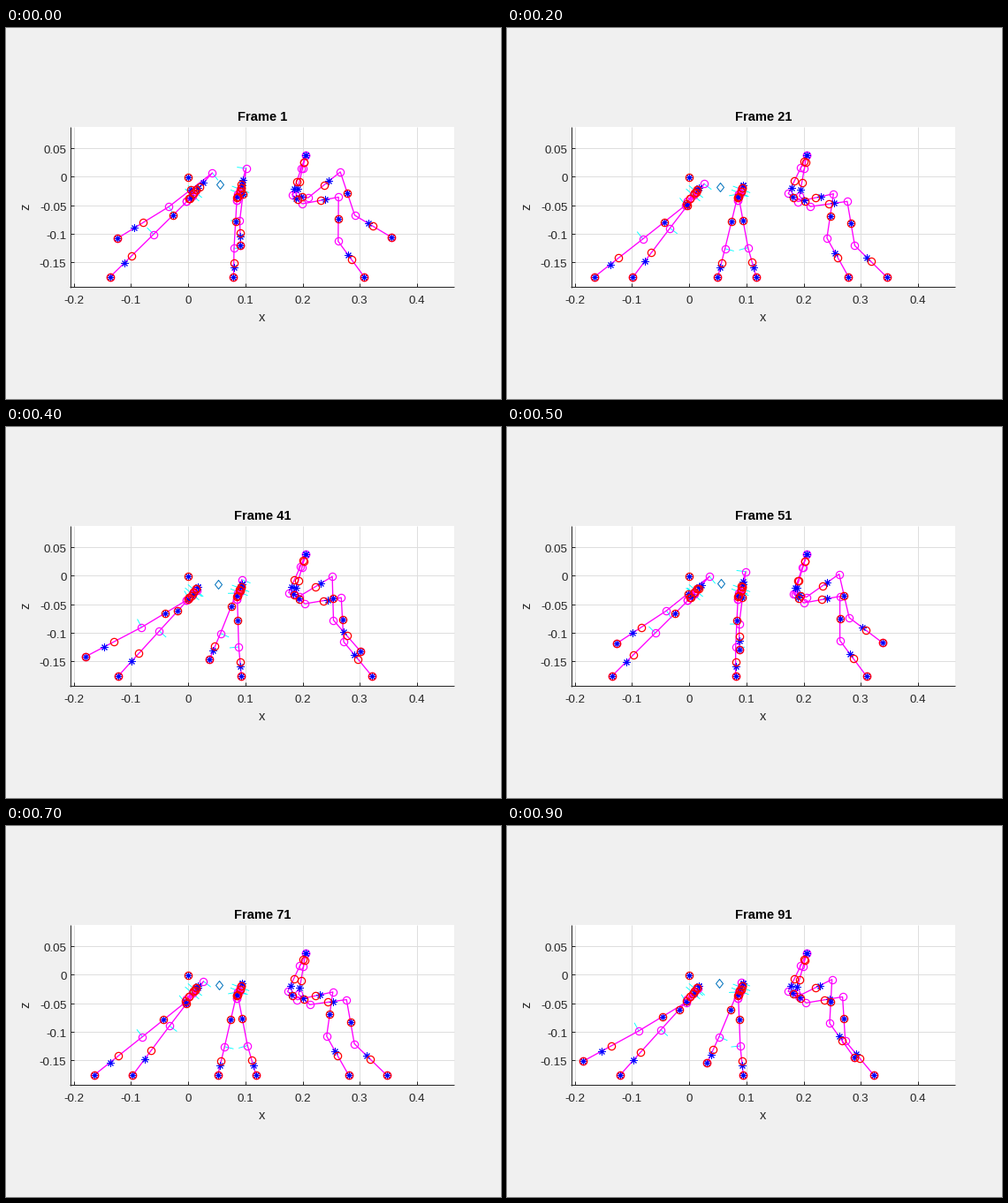
A matplotlib script for the animation above (1 s loop, 560 by 420 pixels).

```python
from collections import namedtuple

import numpy as np
import matplotlib.pyplot as plt
from matplotlib.animation import FuncAnimation

W, H, PT = 560, 420, 0.72          # stage in pixels, points per pixel
FRAMES, CYCLE, LAG = 10, 5, 0.12   # the second stride runs slightly late
INK, GROUND = "#262626", 281.5
ORIGIN, SCALE = np.array([206.2, 168.7]), 647.5

# A joint sits at `rest` and follows the foot's travel and its lift.
Joint = namedtuple("Joint", "rest travel lift")
Shape = namedtuple("Shape", "root foot_ref hip joints stars")
Gait = namedtuple("Gait", "landing swing drift skew")
Leg = namedtuple("Leg", "shape gait landing_x height reach tick_side")

REAR_STARS = {0: 0, 3: 0.65, 4: 0.5, 5: 0.67}
FRONT_STARS = {0: 0, 1: 0.77, 2: 0.4, 3: 0.64, 4: 0.5, 5: 0.38}
HIND = Shape((217.5, 181), 121, (204.5, 196), [
    Joint((213, 188), (0.48, -0.55), (0.41, -0.48)),
    Joint((169.5, 232.2), (0.70, -0.28), (0.25, -0.65))], REAR_STARS)
MIDDLE = Shape((267.5, 178), 258, (261, 195), [
    Joint((262, 187.5), (0, 0), (0.28, -0.80)),
    Joint((258.5, 248.8), (0.60, -0.03), (0.05, -0.86))], REAR_STARS)
FRONT = Shape((339.5, 144), 406, None, [
    Joint((324.3, 188.2), (0.29, 0.07), (-0.10, -0.03)),
    Joint((335.8, 198.5), (0.33, 0.13), (-0.08, -0.24)),
    Joint((376.7, 191), (0.36, 0.20), (-0.20, -0.77)),
    Joint((376.3, 241), (0.73, 0.20), (-0.08, -0.79))], FRONT_STARS)

EARLY = Gait(landing=1.25, swing=1.5, drift=7.8, skew=0.5)
LATE = Gait(landing=4.85, swing=1.2, drift=9.5, skew=1)
LEGS = [Leg(HIND, EARLY, 148.8, 46, 5, 1), Leg(HIND, LATE, 119.5, 28, 0, -1),
        Leg(MIDDLE, EARLY, 288.3, 38, 4, -1), Leg(MIDDLE, LATE, 259.4, 24, 0, 1),
        Leg(FRONT, EARLY, 436, 47, 38, 0), Leg(FRONT, LATE, 407.4, 35, 25, 0)]


def foot(leg, t):
    """Foot x and lift: steady drift on the ground, then an arched swing."""
    gait = leg.gait
    stance = CYCLE - gait.swing
    since = (t - gait.landing) % CYCLE
    if since < stance:
        return leg.landing_x - gait.drift * since, 0
    u = (since - stance) / gait.swing
    ease = u * u * (3 - 2 * u)
    x = leg.landing_x - gait.drift * stance * (1 - ease)
    return (x + leg.reach * np.sin(np.pi * u ** 0.8),
            leg.height * np.sin(np.pi * u ** gait.skew))


def chain(leg, t):
    shape = leg.shape
    x, lift = foot(leg, t)
    joints = [np.array(j.rest) + np.array(j.travel) * (x - shape.foot_ref)
              + np.array(j.lift) * lift for j in shape.joints]
    root = np.array(shape.root)
    if shape.hip:
        upper = [root + (np.array(shape.hip) - root) * f for f in (0.25, 0.5, 1)]
    else:
        upper = [root + 0.32 * (joints[0] - root)]
    return np.array([root, *upper, *joints, (x, GROUND - lift)])


def midpoints(points):
    return (points[:-1] + points[1:]) / 2


def star_points(leg, points):
    return np.array([points[i] + f * (points[i + 1] - points[i])
                     for i, f in leg.shape.stars.items()])


def side_tick(points, joint, side, length=10):
    """Short stroke at a joint, square to the next segment."""
    dx, dy = points[joint + 1] - points[joint]
    normal = np.array([dy, -dx]) / np.hypot(dx, dy)
    return np.array([points[joint], points[joint] + side * length * normal])


def join(parts):
    gap = np.full((1, 2), np.nan)
    return np.vstack([np.vstack([p, gap]) for p in parts])


fig = plt.figure(figsize=(W / 100, H / 100), dpi=100, facecolor="#f0f0f0")
ax = fig.add_axes([0, 0, 1, 1])
ax.set_xlim(0.5, W + 0.5)
ax.set_ylim(H - 0.5, -0.5)
ax.axis("off")


def label(x, y, text, size=13.33, **kw):
    style = dict(family="Liberation Sans", color=INK, ha="center", va="baseline")
    return ax.text(x, y, text, fontsize=size * PT, **{**style, **kw})


def rule(xs, ys, color, z=1):
    ax.plot(xs, ys, color=color, lw=PT, zorder=z, solid_capstyle="butt")


LEFT, RIGHT, TOP, BOTTOM = 73, 507, 112, 293
ax.add_patch(plt.Rectangle((LEFT, TOP), RIGHT - LEFT + 0.5, BOTTOM - TOP,
                           fc="white", ec="none", zorder=0))
for value in np.arange(-2, 5) / 10:
    x = round(ORIGIN[0] + SCALE * value)
    rule([x, x], [TOP, BOTTOM], "#dedede")
    rule([x, x], [BOTTOM - 4.5, BOTTOM], INK, 1.5)
    label(x + 0.5, 312, f"{value:g}")
for value in np.arange(1, -4, -1) / 20:
    y = int(ORIGIN[1] - SCALE * value)
    rule([LEFT, RIGHT], [y, y], "#dedede")
    rule([LEFT, LEFT + 4.5], [y, y], INK, 1.5)
    label(69, y + 6, f"{value:g}", ha="right")
rule([LEFT, LEFT], [TOP, BOTTOM + 0.5], INK, 1.5)
rule([LEFT - 0.5, RIGHT + 0.5], [BOTTOM, BOTTOM], INK, 1.5)
label(290.5, 332, "x", 14.67)
label(30, 202, "z", 14.67, rotation=90, ha="right", va="center")
title = label(290.5, 105, "", 14.67, weight="bold", color="black")


def layer(color, z, marker=None, size=8.3, lw=1.0, edge=1.0, line="none"):
    return ax.plot([], [], color=color, ls=line, lw=lw * PT, marker=marker,
                   ms=size * PT, mfc="none", mec=color, mew=edge * PT, zorder=z)[0]


ticks = layer("cyan", 2, line="-", lw=0.9)
bones = layer("magenta", 3, "o", lw=1.33, edge=1.2, line="-")
stars = layer("blue", 4, (8, 2, 0), size=8)
centers = layer("red", 5, "o", edge=1.25)
diamond = layer("#0072bd", 4, [(0, 1), (0.8, 0), (0, -1), (-0.8, 0), (0, 1)], 10)


def update(i):
    t = i if i < CYCLE else (i - CYCLE - LAG) % CYCLE
    chains = [chain(leg, t) for leg in LEGS]
    fixed = [ORIGIN] + [points[-1] for points in chains]

    bones.set_data(*join([points[1:] if leg.shape.hip else points
                          for leg, points in zip(LEGS, chains)]).T)
    centers.set_data(*np.vstack([midpoints(p) for p in chains] + fixed).T)
    stars.set_data(*np.vstack([star_points(leg, p)
                               for leg, p in zip(LEGS, chains)] + fixed).T)
    ticks.set_data(*join([side_tick(p, joint, leg.tick_side)
                          for leg, p in zip(LEGS, chains) if leg.tick_side
                          for joint in (1, 2, 4, 5)]).T)
    angle = 2 * np.pi / CYCLE
    diamond.set_data([241.5 + 1.2 * np.cos(angle * (t - 0.7))],
                     [178 - 1.5 * np.cos(angle * (t + 0.2))])
    title.set_text(f"Frame {10 * i + 1}")
    return ticks, bones, stars, centers, diamond, title


anim = FuncAnimation(fig, update, frames=FRAMES, interval=100, repeat=True)
plt.show()
```
